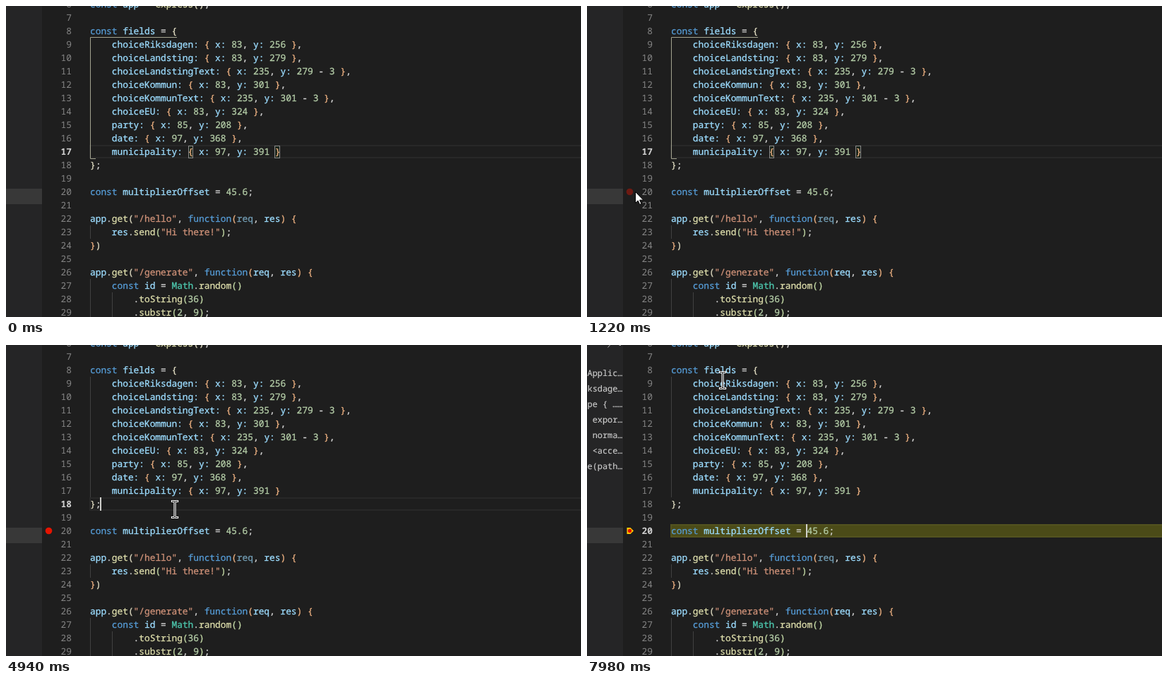
Animation, 814 px wide and 441 px high, one loop 8 s. Source, as an HTML page:

```html
<!DOCTYPE html>
<html lang="en">
<head>
<meta charset="utf-8">
<title>Debugging in the editor</title>
<style>
  html, body { margin: 0; width: 100%; height: 100%; overflow: hidden; background: #1e1e1e; }
  svg { display: block; width: 814px; height: 441px; }
  text {
    font: 12.83px "Noto Sans Mono", "DejaVu Sans Mono", monospace;
    font-variant-ligatures: none;
    text-rendering: geometricPrecision;
    white-space: pre;
    color: #d4d4d4;
  }
  text, tspan { fill: currentColor; stroke: currentColor; stroke-width: .3px; }
  .num { color: #858585; text-anchor: end; stroke: none; }
  .num.active { color: #d0d0d0; font-weight: 700; }
  .side text { font-size: 11.9px; color: #cccccc; stroke-width: .15px; }
  .prose { font: 13px "Open Sans", "Noto Sans", sans-serif; color: #cccccc; stroke: none; }
  .str { color: #ce9178; }
  .key { color: #569cd6; }
  .type { color: #4ec9b0; }
  .fn { color: #dcdcaa; }
  .lit { color: #b5cea8; }
  .id { color: #9cdcfe; }
  .unused { opacity: .67; }
  .b0 { color: #dedac0; }
  .b1 { color: #ecb080; }
  .b2 { color: #c3d9a6; }
  .guide { stroke: #404040; }
  .scope { stroke: #a3a38f; fill: none; }
  .match { fill: rgba(0, 100, 0, .1); stroke: #888888; }
  .fold { fill: none; stroke: #858585; }
</style>
</head>
<body>
<svg id="stage" viewBox="0 0 814 441">
  <rect width="814" height="441" fill="#1e1e1e"/>
  <rect width="51" height="441" fill="#252526"/>
  <rect y="259" width="51" height="22" fill="#383838"/>
  <g id="stack" class="side">
    <path d="M29.500 3.500l3.500-4M45.500 .5h2.500" stroke="#b0b0b0" fill="none"/>
  </g>

  <rect id="lineBox" x="119" width="720" height="17" fill="none" stroke="#282828" stroke-width="2"/>
  <rect id="stopLine" x="118" y="254" width="696" height="19" fill="#ffff00" fill-opacity=".2"/>
  <rect id="word" x="180" y="311" width="31" height="19" fill="#264f78" fill-opacity=".3"/>
  <g id="guides"></g>
  <g id="brackets">
    <path class="scope" d="M242 44.500H119.500V216.500H127"/>
    <rect class="match" x="258.500" y="198.500" width="6" height="17"/>
    <rect class="match" x="380.500" y="198.500" width="7" height="17"/>
  </g>
  <g id="code"></g>
  <g id="folds"></g>

  <circle id="dot" cx="60.500" cy="263.500" r="4.800" fill="#e51400"/>
  <g id="stopMark">
    <path d="M56.500 259h5l4.500 4.500l-4.500 4.500h-5z" fill="#ffcc00"/>
    <circle cx="60.500" cy="263.500" r="2.700" fill="#e51400"/>
  </g>
  <rect id="caret" width="2" height="19" fill="#d0d0cc"/>

  <g id="tip">
    <rect x="181.500" y="126.500" width="396" height="186" fill="#252526" stroke="#454545"/>
    <path d="M182 154.500H577" stroke="#454545"/>
    <text class="prose" x="187" y="174">Send a response.</text>
    <text class="prose" x="187" y="201">Examples:</text>
  </g>

  <circle id="press" r="15" fill="#ffff00" fill-opacity=".45"/>
  <g id="mouse">
    <g id="beam" fill="none" stroke-linecap="square">
      <path id="beamPath" d="M-3.500-11.500H-1.500L0-10.500L1.500-11.500H3.500M0-10.500V10.500M-3.500 11.500H-1.500L0 10.500L1.500 11.500H3.500" stroke="#fff" stroke-width="3.200"/>
      <path d="M-3.500-11.500H-1.500L0-10.500L1.500-11.500H3.500M0-10.500V10.500M-3.500 11.500H-1.500L0 10.500L1.500 11.500H3.500" stroke="#000" stroke-width="1"/>
    </g>
    <path id="arrow" d="M.5.5V16.500L4.200 13L6.700 18.500L9 17.500L6.600 12.200H11.800Z" fill="#fff" stroke="#000"/>
  </g>
</svg>
<script>
const LOOP = 8000, CHAR = 7.7, LEFT = 118, ROW = 19;
const SVG = "http://www.w3.org/2000/svg";
const $ = id => document.getElementById(id);
const lineTop = n => 26 + (n - 8) * ROW;

function add(parent, tag, attrs, content) {
  const el = document.createElementNS(SVG, tag);
  for (const key in attrs) el.setAttribute(key, attrs[key]);
  if (content !== undefined) el.textContent = content;
  parent.appendChild(el);
  return el;
}

const TOKEN = /(?<str>"[^"]*"|'[^']*')|(?<key>=>|\b(?:const|function|new)\b)|(?<type>\b(?:Math|Buffer|any)\b)|(?<plain>property)|(?<fn>\w+(?=\())|(?<lit>\d[\d.]*)|(?<id>[A-Za-z]\w*:?)|(?<open>[({])|(?<close>[)}])|\s+|./g;
let depth = 0;

function writeCode(parent, x, y, line, colored, unused) {
  const body = line.trimStart();
  const text = add(parent, "text", { x: x + (line.length - body.length) * CHAR, y });
  for (const m of body.matchAll(TOKEN)) {
    const g = m.groups;
    let cls = ["str", "key", "type", "fn", "lit", "id"].find(k => g[k]) || "";
    if (colored && g.open) cls = "b" + depth++ % 3;
    if (colored && g.close) cls = "b" + --depth % 3;
    if (unused && m[0] === unused) cls += " unused";
    add(text, "tspan", { class: cls }, m[0]);
  }
}

const source = `const app = express();

const fields = {
    choiceRiksdagen: { x: 83, y: 256 },
    choiceLandsting: { x: 83, y: 279 },
    choiceLandstingText: { x: 235, y: 279 - 3 },
    choiceKommun: { x: 83, y: 301 },
    choiceKommunText: { x: 235, y: 301 - 3 },
    choiceEU: { x: 83, y: 324 },
    party: { x: 85, y: 208 },
    date: { x: 97, y: 368 },
    municipality: { x: 97, y: 391 }
};

const multiplierOffset = 45.6;

app.get("/hello", function(req, res) {
    res.send("Hi there!");
})

app.get("/generate", function(req, res) {
    const id = Math.random()
        .toString(36)
        .substr(2, 9);`.split("\n");

const numbers = {};
source.forEach((line, i) => {
  const n = i + 6, y = lineTop(n) + 14;
  numbers[n] = add($("code"), "text", { class: "num", x: 93, y }, n);
  writeCode($("code"), LEFT + 1, y, line, true, n === 22 ? "req" : "");
});

for (const [x, from, to] of [[119.5, 9, 17], [119.5, 23, 23], [119.5, 27, 29], [150.5, 28, 29]])
  add($("guides"), "path", { class: "guide", d: `M${x} ${lineTop(from)}V${lineTop(to + 1)}` });

for (const n of [8, 22, 26]) {
  const y = lineTop(n) + 5.5;
  add($("folds"), "path", { class: "fold", d: `M103.500 ${y}h8v8h-8zM105 ${y + 4}h5` });
}

writeCode($("tip"), 187.5, 145, "(property) Response.send: (body?: any) => Response");
["new Buffer('wahoo')", "{ some: 'json' }", "'<p>some html</p>'", "404, 'Sorry, cant find that'", "404"]
  .forEach((arg, i) => writeCode($("tip"), 195, 227 + i * ROW, `res.send(${arg});`));

["Applic…", "ksdage…", "pe { ……", " expor…", " norma…", " <acce…", "e(path…"]
  .forEach((s, i) => add($("stack"), "text", { x: .5, y: 43.5 + i * 22 }, s));

const moves = [
  [60, 460, 7, 560, 403, 203, 321, 1.6],
  [740, 870, 3, 203, 321, 150, 301, 1],
  [870, 1280, 7, 150, 301, 62, 260, 1.5],
  [2080, 2560, 8, 187, 242, 239, 233, 1.8],
  [6150, 6410, 5, 239, 233, 222, 253, 1.2],
  [6410, 6610, 4, 222, 253, 222, 264, 1.4],
  [7360, 7780, 7, 222, 264, 190, 105, 1],
  [7780, 7980, 4, 190, 105, 192, 50, 1.5]
];

function mouseAt(t) {
  const move = moves.filter(m => t >= m[0]).pop();
  if (!move) return null;
  const [t0, t1, steps, x0, y0, x1, y1, power] = move;
  const k = Math.min(1, Math.floor((t - t0) / (t1 - t0) * (steps - 1) + 1e-6) / (steps - 1));
  const p = 1 - (1 - k) ** power;
  return [Math.round(x0 + (x1 - x0) * p), Math.round(y0 + (y1 - y0) * p)];
}

const caretOn = [[740, 1200], [1690, 2160], [2280, 2760], [3240, 3640], [4120, 4520],
  [4940, 5740], [6150, 6610], [7030, 7440], [7860, LOOP]];
const caretX = { 17: 387, 18: 133, 20: 310 };

const within = (t, a, b) => t >= a && t < b;
const show = (id, on) => $(id).style.display = on ? "" : "none";
const setY = (id, y) => $(id).setAttribute("y", y);

function render(t) {
  const line = t < 2280 ? 17 : t < 5330 ? 18 : 20;
  const stopped = t >= 5330;

  setY("lineBox", lineTop(line) + 1);
  for (const n in numbers) numbers[n].classList.toggle("active", +n === line);
  show("brackets", line === 17);
  $("caret").setAttribute("x", caretX[line]);
  setY("caret", lineTop(line));
  show("caret", caretOn.some(([a, b]) => within(t, a, b)));

  show("word", within(t, 740, 940));
  show("tip", within(t, 740, 940));
  $("folds").style.opacity = within(t, 1280, 2080) ? .2 : within(t, 2080, 2480) ? 1 : within(t, 2480, 2560) ? .4 : 0;

  show("dot", t >= 1210 && !stopped);
  $("dot").style.opacity = t < 1880 ? .4 : 1;
  show("stopMark", stopped);
  show("stopLine", stopped);
  show("stack", t >= 5400);

  const pos = mouseAt(t);
  show("mouse", pos);
  show("press", within(t, 1690, 1880) || within(t, 2290, 2480));
  if (pos) {
    const place = `translate(${pos})`;
    $("mouse").setAttribute("transform", place);
    $("press").setAttribute("transform", place);
    show("beam", pos[0] >= LEFT);
    show("arrow", pos[0] < LEFT);
  }
}

const start = performance.now();
function tick() {
  render((performance.now() - start) % LOOP);
  requestAnimationFrame(tick);
}
tick();
</script>
</body>
</html>
```
